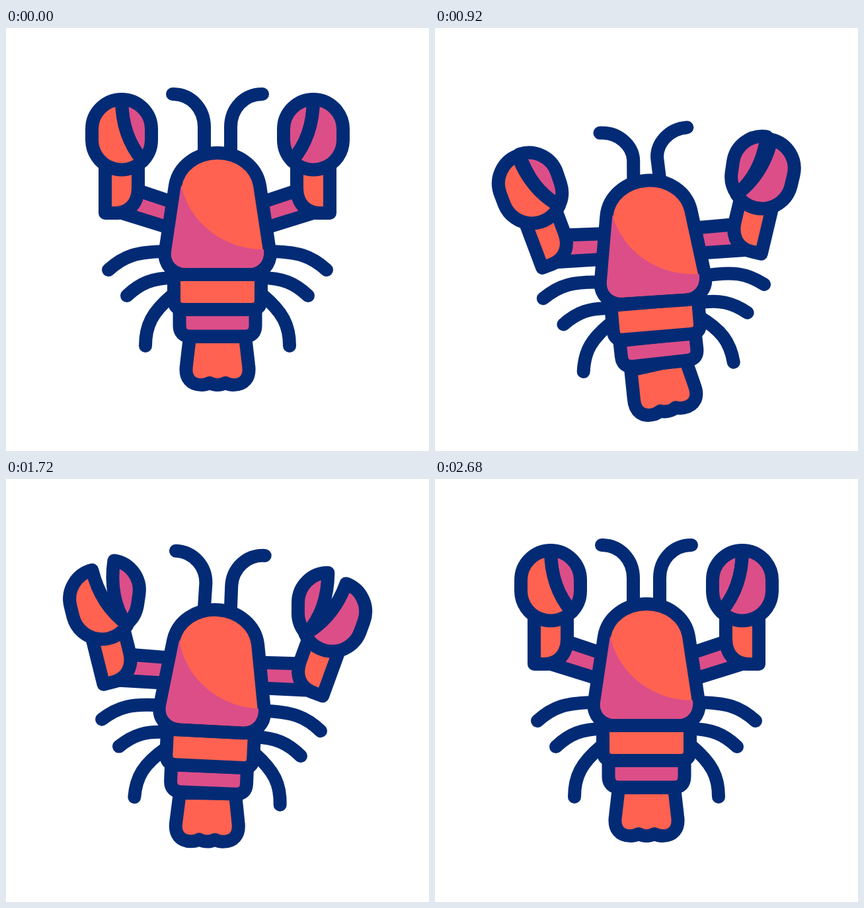
An HTML page for the animation above (3.6 s loop, 640x640 px).

```html
<!DOCTYPE html>
<html lang="en">
<head>
<meta charset="utf-8">
<title>Swimming lobster</title>
<style>
  html, body { margin: 0; width: 100%; height: 100%; overflow: hidden; background: #fff; }
  svg { display: block; width: 100vw; height: 100vh; }
  path { stroke: #032b75; stroke-width: 20; stroke-linecap: round; stroke-linejoin: round; fill: none; }
  .coral { fill: #ff6250; }
  .pink { fill: #dc4e88; }
  .plain { stroke: none; }
</style>
</head>
<body>
<svg viewBox="0 0 640 640"></svg>
<script>
const LOOP = 3600;
const svg = document.querySelector('svg');

const mirrored = content => `<g transform="matrix(-1 0 0 1 640 0)">${content}</g>`;

const limbs = `
  <path class="antenna"/>
  <path class="leg" data-pivot="240 338" d="M155 366C178 345 198 338 245 338"/>
  <path class="leg" data-pivot="248 378" d="M183 405C203 386 222 378 254 378"/>
  <path class="leg" data-pivot="300 430" d="M211 481C211 450 221 430 252 404"/>`;

const arm = clawColor => `
  <g class="arm">
    <path class="pink plain" d="M203 247L256 264L246 302L172 279Z"/>
    <path d="M203 247L254 264M172 279L246 302"/>
    <path class="coral" d="M150 208V280H165C187 280 200 264 200 242V208Z"/>
    <path class="pincer pink" d="M175 108A45 45 0 0 1 220 153V170A45 45 0 0 1 207 201C186 176 175 147 175 108Z"/>
    <path class="${clawColor}" d="M175 108A45 45 0 0 0 130 153V170A45 45 0 0 0 207 201C186 176 175 147 175 108Z"/>
  </g>`;

svg.innerHTML = `
  <g id="body">
    ${limbs}${mirrored(limbs)}
    ${arm('coral')}${mirrored(arm('pink'))}
    <g id="tail1">
      <g id="tail2">
        <path id="fan" class="coral" d="M278 467L273 510C270 530 280 540 296 540Q302 540 308 537Q320 543 332 537Q338 540 344 540C360 540 370 530 367 510L362 467Z"/>
        <path class="pink" d="M262.5 426V450Q262.5 466.5 279 466.5H361Q377.5 466.5 377.5 450V426Z"/>
      </g>
      <path class="coral" d="M254 373V411Q254 426 269 426H371Q386 426 386 411V373Z"/>
    </g>
    <path class="coral" d="M272 373H368C388 373 402 356 399 337L384 238C379 209 352 189 320 189C288 189 261 209 256 238L241 337C238 356 252 373 272 373Z"/>
    <path class="pink plain" d="M265 237C275 290 325 335 390 335C392 352 382 363 368 363H272C257 363 248 352 250 338Z"/>
  </g>`;

const all = selector => [...svg.querySelectorAll(selector)];
const [body, tail1, tail2, fan] = ['#body', '#tail1', '#tail2', '#fan'].map(id => svg.querySelector(id));
const antennae = all('.antenna'), legs = all('.leg'), arms = all('.arm'), pincers = all('.pincer');

// Each track holds [time, value] pairs joined by sine easing.
const bobKeys = [[160, 0], [490, -29], [960, 43], [1465, -29], [1960, 43], [2480, 0]];
const turnKeys = [[160, 0], [480, 4], [1120, -5.8], [1620, 4.2], [2120, -7.8], [2640, 0]];
const swayKeys = [[160, 0], [445, 1], [955, -1], [1430, 1], [1930, -1], [2420, 0]];
const spreadKeys = [[160, 0], [600, 17], [2240, 17], [2680, 0]];

function track(keys, t) {
  const next = keys.findIndex(key => key[0] > t);
  if (next < 1) return 0;
  const [t0, v0] = keys[next - 1], [t1, v1] = keys[next];
  return v0 + (v1 - v0) * (1 - Math.cos(Math.PI * (t - t0) / (t1 - t0))) / 2;
}

// Three snaps, 535 ms each.
function snap(t, start) {
  const phase = (t - start) / 535;
  return phase > 0 && phase < 3 ? 24.5 * Math.sin(Math.PI * phase) ** 2 : 0;
}

// The feeler stretches upwards and slightly outwards from its base.
function antennaPath(sway) {
  const up = 13 * sway, out = 2 * sway;
  return `M${252 - out} ${100 - up}C${280 - out} ${100 - up} ${300 - out} ${122 - up} ${300 - out} ${150 - up / 2}L300 190V215`;
}

const move = (el, transform) => el.setAttribute('transform', transform);
const rotate = (el, angle, pivot) => move(el, `rotate(${angle} ${pivot})`);

function draw(now) {
  const t = now % LOOP;
  const sway = track(swayKeys, t);
  const spread = track(spreadKeys, t);
  move(body, `translate(0 ${track(bobKeys, t)}) rotate(${track(turnKeys, t)} 320 185)`);
  antennae.forEach(el => el.setAttribute('d', antennaPath(sway)));
  legs.forEach(el => rotate(el, -6 * sway, el.dataset.pivot));
  arms.forEach(el => rotate(el, -spread, '255 282'));
  pincers.forEach((el, i) => rotate(el, snap(t, i ? 305 : 435), '208 195'));
  rotate(tail1, 1.3 * sway, '320 373');
  rotate(tail2, 1.3 * sway, '320 426');
  rotate(fan, 6.5 * sway, '320 500');
  requestAnimationFrame(draw);
}
requestAnimationFrame(draw);
</script>
</body>
</html>
```
